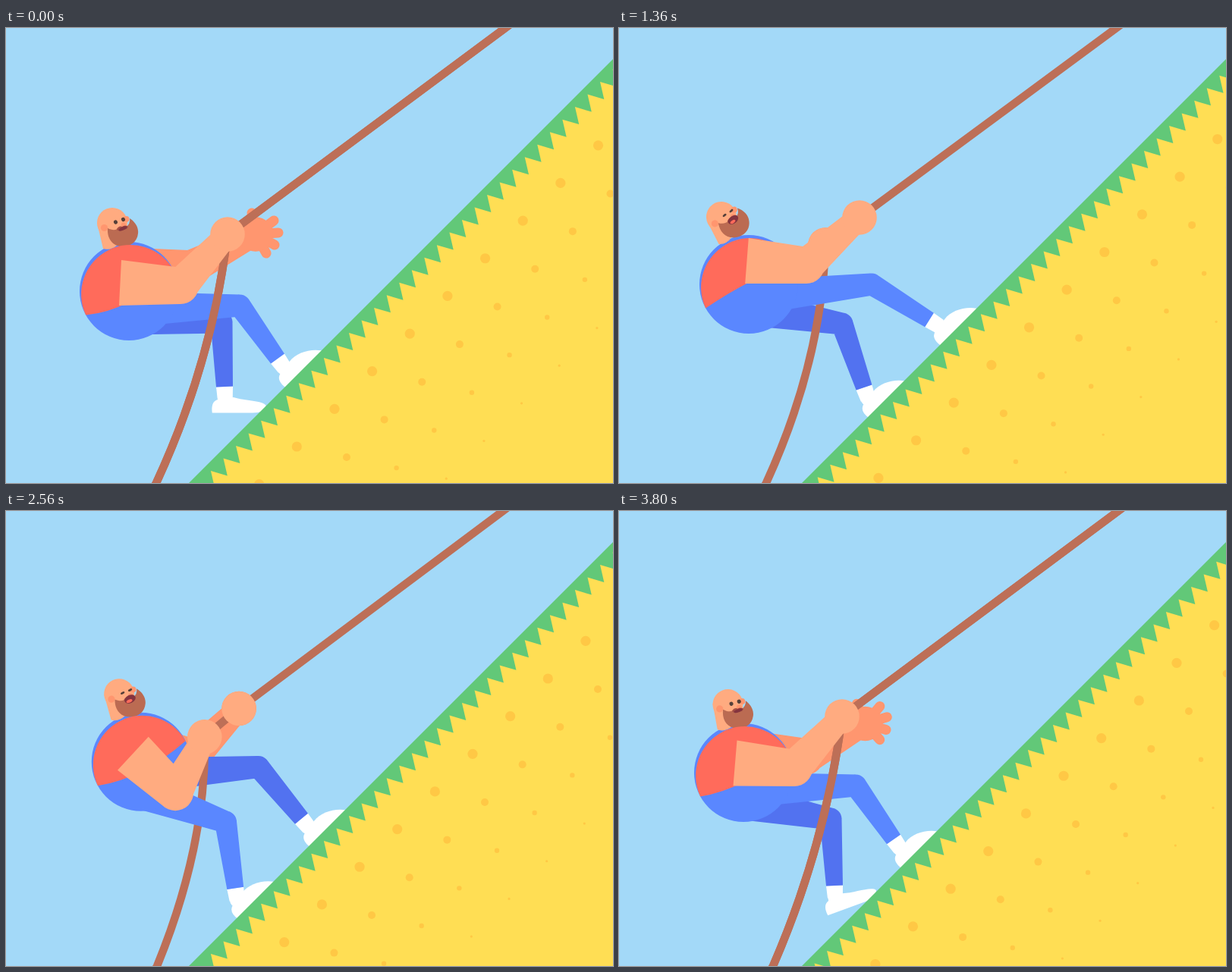
These frames come from a looping animation (800x600 px, 3.84 s). An HTML page:

```html
<!DOCTYPE html>
<html lang="en">
<head>
<meta charset="utf-8">
<title>Rope climb</title>
<style>
html, body { margin: 0; width: 100%; height: 100%; overflow: hidden; background: #a3d9f8; }
svg { display: block; width: 800px; height: 600px; }
</style>
</head>
<body>
<svg id="stage" viewBox="0 0 800 600" xmlns="http://www.w3.org/2000/svg"></svg>
<script>
const HALF = 960, FULL = 1920, LOOP = 3840, STEP = 40;
const SKIN = '#ffab80', SKIN_FAR = '#ff966f', JEANS = '#5a87ff', JEANS_FAR = '#5272f0';
const SHIRT = '#ff6b5b', SHIRT_FAR = '#d9534f', ROPE = '#bd6f57', BEARD = '#bb6b52';
const TOOTH = 16.55, GAP = TOOTH * 3, RISE = GAP * 2 / HALF;

// time, body x y, skull x y, head turn, mouth, rope end x
const BODY = [
  [0, 162, 347, 140, 257, 0, 2.2, 196],
  [120, 158.5, 350.5, 129, 261, -4, 2.2, 189],
  [280, 164, 345, 123.5, 257, -9, 2.8, 186],
  [400, 171, 338, 135, 249, -14, 5, 194.5],
  [600, 178, 330.5, 148, 241, -4, 5.5, 199],
  [920, 164, 345, 143.5, 255, 3, 2.2, 201]
];
// time, hip drop, knee x y, ankle x y, foot angle, toe bend
const LEG = [
  [0, 24, 308, 366, 358, 436, -45, 0],
  [280, 32, 292, 384, 333, 463, -45, 0],
  [400, 31, 294, 390, 323, 474, -45, 0],
  [600, 38, 291, 406, 306, 493, -45, 0],
  [800, 42, 282, 422, 288, 510, -45, 0],
  [920, 39, 279, 406, 284, 494, -20, 1],
  [960, 34, 284, 388, 288, 473, 0, 1],
  [1100, 30, 290, 338, 318, 420, 5, 0],
  [1240, 28, 315, 327, 380, 385, -64, 0],
  [1360, 18, 333, 338, 409, 385, -45, 0],
  [1560, 18, 334, 336, 393, 402, -45, 0],
  [1880, 23, 312, 362, 362, 433, -45, 0]
];
// time, shoulder x y, elbow x y, hand x y, hand angle
const ARM = [
  [0, 150.5, 336, 230, 340, 290, 270, 0],
  [280, 149.5, 339.5, 228, 354, 274, 277, 0],
  [400, 156, 333, 227, 363, 272.5, 286.5, 0],
  [600, 166.5, 321, 223, 372, 265, 296, 0],
  [720, 168, 318, 225, 366, 262, 303, -30],
  [920, 162, 318, 246, 324, 322.5, 278.5, -13],
  [960, 159, 319.5, 241, 317, 327, 270, 0],
  [1060, 160, 318, 240, 308, 328, 251, 15],
  [1240, 169, 312, 240, 302, 318, 242, 0],
  [1360, 168.5, 307, 247, 313, 317.5, 250.5, 0],
  [1560, 168, 305, 246, 322, 310, 260, 0],
  [1880, 153, 332.5, 231, 339, 292, 269, 0]
];
const HEM = [[0, 12], [280, 9], [600, 11], [960, 0], [1360, -5], [1880, 10]];

// Smooth periodic curve through the keys
function sample(keys, period, time) {
  const t = ((time % period) + period) % period, n = keys.length;
  const key = i => keys[(i + n) % n];
  const at = i => key(i)[0] + Math.floor(i / n) * period;
  let i = n - 1;
  while (keys[i][0] > t) i--;
  const h0 = at(i) - at(i - 1), h = at(i + 1) - at(i), h2 = at(i + 2) - at(i + 1);
  const s = (t - at(i)) / h, r = 1 - s;
  return keys[0].slice(1).map((_, c) => {
    const [a, b, d, e] = [-1, 0, 1, 2].map(j => key(i + j)[c + 1]);
    const v0 = (b - a) / h0, v = (d - b) / h, v2 = (e - d) / h2;
    const m0 = (v0 * h + v * h0) / (h0 + h), m1 = (v * h2 + v2 * h) / (h + h2);
    return b * r * r * (1 + 2 * s) + d * s * s * (3 - 2 * s) + h * s * r * (m0 * r - m1 * s);
  });
}

const ramp = (a, b, t) => {
  const s = Math.min(1, Math.max(0, (t - a) / (b - a)));
  return s * s * (3 - 2 * s);
};
const mix = (a, b, s) => a + (b - a) * s;
const mixPt = (p, q, s) => [mix(p[0], q[0], s), mix(p[1], q[1], s)];
const f = v => v.toFixed(2);
const pt = p => f(p[0]) + ' ' + f(p[1]);
const disc = ([x, y], r) => `M${f(x - r)} ${f(y)}a${r} ${r} 0 1 0 ${2 * r} 0a${r} ${r} 0 1 0 ${-2 * r} 0Z`;

function taper(a, ra, b, rb) {
  const dx = b[0] - a[0], dy = b[1] - a[1], l = Math.hypot(dx, dy) || 1;
  const side = (p, r) => pt([p[0] - dy / l * r, p[1] + dx / l * r]);
  return `M${side(a, ra)}L${side(b, rb)}L${side(b, -rb)}L${side(a, -ra)}Z`;
}

function along(a, b, d) {
  return mixPt(a, b, d / (Math.hypot(b[0] - a[0], b[1] - a[1]) || 1));
}

function add(parent, tag, attrs) {
  const el = document.createElementNS('http://www.w3.org/2000/svg', tag);
  for (const k in attrs) el.setAttribute(k, attrs[k]);
  return parent.appendChild(el);
}
const set = (el, k, v) => el.setAttribute(k, v);

const stage = document.getElementById('stage');
const shape = (fill, parent = stage) => add(parent, 'path', { fill });
const ropeLine = () => add(stage, 'path', { fill: 'none', stroke: ROPE, 'stroke-width': 10.5 });

function makeArm(skin) {
  return { sleeve: shape(SHIRT_FAR), limb: shape(skin), fingers: add(stage, 'path', {
    fill: 'none', stroke: skin, 'stroke-width': 13, 'stroke-linecap': 'round' }), palm: shape(skin) };
}
function makeLeg(cloth) {
  return { shoe: shape('#fff'), sock: shape('#fff'), limb: shape(cloth) };
}

add(stage, 'rect', { width: 800, height: 600, fill: '#a3d9f8' });
const farArm = makeArm(SKIN_FAR);
const farLeg = makeLeg(JEANS_FAR);
const ropeBack = ropeLine();
const farFist = shape(SKIN);
const nearLeg = makeLeg(JEANS);
const ropeFront = ropeLine();
const hips = shape(JEANS);
const head = add(stage, 'g', {});
const shirt = shape(SHIRT);

// Head, with the skull centre at 0,0
add(head, 'path', { fill: SKIN, d: 'M-20 0L-12 34Q-2 37 7 29L12 0Z' });
add(head, 'circle', { r: 20, fill: SKIN });
add(head, 'circle', { cx: 18.5, cy: -5, r: 4, fill: SKIN_FAR });
add(head, 'path', { fill: BEARD, d: 'M-6 7C0 10 6 10 9 6Q15 2 20 4Q24 0 23 -6C31 -1 35 7 34 14C33 25 24 31 14 31C0 31 -7 20 -6 7Z' });
add(head, 'circle', { cx: -10.5, cy: 6.5, r: 4.6, fill: SKIN_FAR });
add(head, 'circle', { cx: 15, cy: 3, r: 3.4, fill: SKIN_FAR });
const eyes = [[4.5, -1], [14.5, -4.5]].map(([x, y]) =>
  add(head, 'ellipse', { fill: '#54403a', transform: `translate(${x} ${y}) rotate(-24)` }));
add(head, 'path', { fill: '#a34f45', d: 'M6 8Q9 3 13 5Q17 2 21 5L19 8Q13 8 7 10Z' });
const mouth = add(head, 'ellipse', { fill: '#84343f', transform: 'translate(14 7.5) rotate(-24)' });
const tongue = add(head, 'ellipse', { fill: '#ff6b5b', transform: 'translate(13 10) rotate(-20)' });

const nearArm = makeArm(SKIN);
nearArm.sleeve.remove();

// Hill
add(stage, 'path', { fill: '#62c878', d: 'M800 41L241 600H800Z' });
const soil = add(stage, 'path', { fill: '#ffde54' });
const dots = add(stage, 'g', { fill: '#ffc845' });
let zig = '';
for (let n = -3; n < 38; n++) {
  const x = 783 - TOOTH * n, y = 71 + TOOTH * n;
  zig += `${n < -2 ? 'M' : 'L'}${pt([x, y])}L${pt([x + 5.3, y + 23])}`;
}
set(soil, 'd', zig + 'L900 720Z');
[6.6, 5, 3.2, 1.6].forEach((r, j) => {
  for (let n = -2; n < 11; n++)
    add(dots, 'circle', { cx: f(780.5 + j * 16 - GAP * n), cy: f(154.8 + j * 63.7 + GAP * n), r });
});

function armPose(time, sway) {
  const w = time % FULL, [sx, sy, ex, ey, hx, hy, turn] = sample(ARM, FULL, w);
  const open = ramp(720, 820, w) * (1 - ramp(1040, 1120, w));
  return { s: [sx, sy], e: [ex, ey], h: [hx + sway, hy + sway], turn, open };
}

function drawArm(arm, { s, e, h, turn, open }) {
  set(arm.limb, 'd', taper(s, 30, e, 24) + disc(e, 24) + taper(e, 23, h, 15));
  set(arm.sleeve, 'd', taper(s, 30, along(s, e, 20), 29));
  set(arm.palm, 'd', disc(h, 22.8));
  const a = turn * Math.PI / 180, c = Math.cos(a) * open, n = Math.sin(a) * open;
  const tips = [[-5, -28], [24, -18], [30, -2], [25, 14], [14, 25]];
  set(arm.fingers, 'd', tips.map(([x, y]) =>
    `M${pt(h)}L${pt([h[0] + x * c - y * n, h[1] + x * n + y * c])}`).join(''));
}

function drawLeg(leg, time, body) {
  const [drop, kx, ky, ax, ay, turn, bend] = sample(LEG, FULL, time);
  const hip = [body[0], body[1] + drop], knee = [kx, ky], ankle = [ax, ay];
  const d = Math.hypot(ax - kx, ay - ky), foot = along(knee, ankle, d + 16);
  const b = Math.min(1, Math.max(0, bend));
  set(leg.limb, 'd', taper(hip, 23.5, knee, 14.5) + disc(knee, 14.5) + taper(knee, 14.5, ankle, 11));
  set(leg.sock, 'd', taper(ankle, 11, foot, 10) + disc(foot, 9.5));
  set(leg.shoe, 'd', `M11 -2C26 ${f(mix(-4, 3, b))} ${f(mix(42, 50, b))} ${f(mix(5, 2, b))} ` +
    `${f(mix(51, 54, b))} ${f(mix(17.5, 9, b))}Q${f(mix(51, 52, b))} 18.5 36 18.5H-17Q-19 4 -10 1Z`);
  set(leg.shoe, 'transform', `translate(${pt(foot)}) rotate(${f(turn)})`);
}

function draw(time) {
  const t = time % FULL, u = t % HALF;
  const sway = 2 * Math.cos(2 * Math.PI * t / FULL);
  const [bx, by, sx, sy, turn, gape, endX] = sample(BODY, HALF, u);
  const body = [bx, by], near = armPose(t, sway), far = armPose(t + HALF, sway);

  drawArm(nearArm, near);
  drawArm(farArm, far);
  set(farFist, 'd', far.open > 0 ? '' : disc(far.h, 22.8));
  drawLeg(nearLeg, t, body);
  drawLeg(farLeg, t + HALF, body);

  // Torso
  set(hips, 'd', disc(body, 65));
  const bow = sample(HEM, FULL, t)[0];
  const left = [bx - 56.8, by + 31.6], right = [bx + 58.9, by - 27.5];
  set(shirt, 'd', `M${pt(left)}A65 65 0 0 1 ${pt(right)}Q${pt([bx + 1, by + 2 + bow * 2])} ${pt(left)}Z`);

  // Head
  set(head, 'transform', `translate(${pt([sx, sy])}) rotate(${f(turn)})`);
  const shut = u >= 120 && u < 840;
  eyes.forEach(e => { set(e, 'rx', shut ? 2.9 : 2.5); set(e, 'ry', shut ? 1.5 : 2.6); });
  set(mouth, 'rx', f(5 + gape * .5));
  set(mouth, 'ry', f(gape));
  set(tongue, 'rx', f(Math.max(0, gape - 1.2)));
  set(tongue, 'ry', f(Math.max(0, gape * .7 - 1.6)));

  // Rope: through the upper hand, then the lower one, then hanging free
  const first = t < HALF, low = first ? near.h : far.h, high = first ? far.h : near.h;
  const top = mixPt(low, high, ramp(60, 140, u));
  const grip = mixPt(low, high, ramp(700, 860, u));
  const edge = [656 + sway, 0], end = [endX + sway, 600];
  const rope = `M${pt(mixPt(top, edge, 1.1))}L${pt(top)}L${pt(grip)}` +
    `Q${pt([grip[0] / 4 + 199, 440])} ${pt(end)}L${pt([end[0] - 8, 614])}`;
  const front = t >= 1680 || t < 100;
  set(ropeFront, 'd', front ? rope : '');
  set(ropeBack, 'd', rope);

  // Ground slides down the slope
  const slide = step => {
    const d = (time * RISE) % step;
    return `translate(${f(-d)} ${f(d)})`;
  };
  set(soil, 'transform', slide(TOOTH));
  set(dots, 'transform', slide(GAP));
}

let start = null;
function tick(now) {
  if (start === null) start = now;
  draw(Math.floor(((now - start) % LOOP) / STEP) * STEP);
  requestAnimationFrame(tick);
}
draw(0);
requestAnimationFrame(tick);
</script>
</body>
</html>
```
